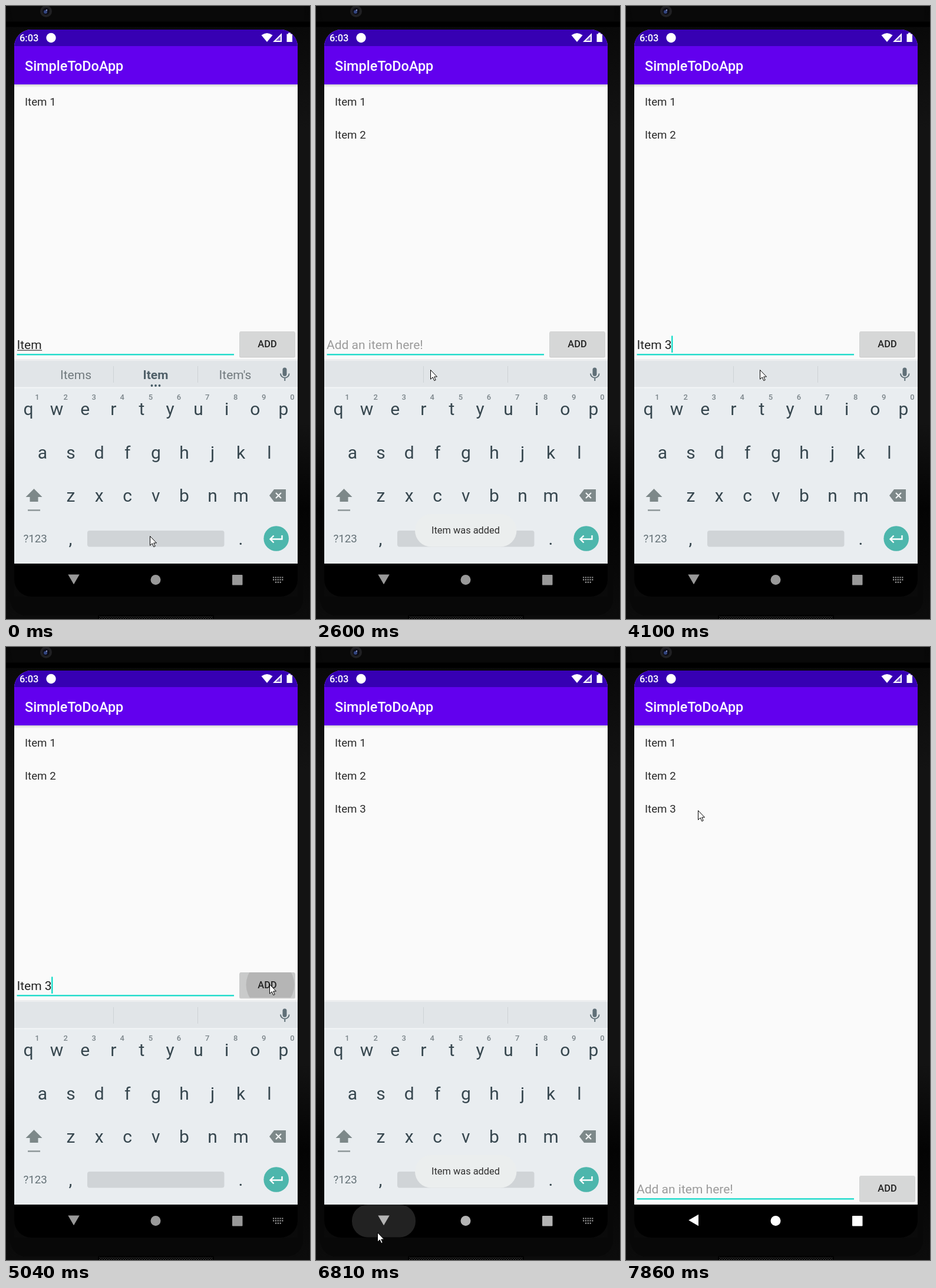
An HTML page for the animation above (8 s loop, 516 px wide and 1040 px high).

```html
<!DOCTYPE html>
<html lang="en">
<head>
<meta charset="utf-8">
<title>To-do list</title>
<style>
  html, body { margin: 0; width: 100%; height: 100%; overflow: hidden; background: #000; }
  svg { display: block; width: 516px; height: 1040px; }
  text { font-family: Roboto, "Open Sans", sans-serif; white-space: pre; }
  .mid { text-anchor: middle; }
  .item { font-size: 18.7px; fill: #2b2b2b; }
  .word { font-size: 21px; fill: #70797d; text-anchor: middle; }
  .key { font-size: 30px; fill: #37474f; text-anchor: middle; }
  .num { font-size: 13px; font-weight: 500; fill: #7b858a; text-anchor: middle; }
</style>
</head>
<body>
<svg viewBox="0 0 516 1040">
  <defs>
    <linearGradient id="side" x2="0" y2="1">
      <stop offset="0" stop-color="#070707"/>
      <stop offset=".2" stop-color="#131313"/>
      <stop offset=".68" stop-color="#131313"/>
      <stop offset=".82" stop-color="#030303"/>
      <stop offset="1" stop-color="#0c0c0c"/>
    </linearGradient>
    <linearGradient id="fade" x2="0" y2="1">
      <stop offset="0" stop-opacity=".16"/>
      <stop offset="1" stop-opacity="0"/>
    </linearGradient>
    <clipPath id="screen"><rect x="14" y="40" width="481" height="962" rx="29"/></clipPath>
    <clipPath id="app"><rect x="14" y="40" width="481" height="906"/></clipPath>
    <clipPath id="face"><rect x="396.500" y="552" width="94" height="43" rx="2"/></clipPath>
    <pattern id="mesh" width="4" height="4" patternUnits="userSpaceOnUse">
      <path d="M0 0h2v2h-2zM2 2h2v2h-2z" fill="#262626"/>
    </pattern>
  </defs>

  <!-- phone body -->
  <rect width="516" height="1040" fill="url(#side)"/>
  <path d="M6 0H506V28H12Z" fill="#090909"/>
  <path d="M0 31H516" stroke="#000" stroke-width="9"/>
  <path d="M14 950V1002H495V950H504V1010Q500 1030 480 1034H30Q10 1030 6 1005V950Z" fill="#080808"/>
  <circle cx="68" cy="9" r="10" fill="#202023"/>
  <circle cx="68" cy="9" r="6" fill="#0d0d16"/>
  <circle cx="67" cy="10" r="3" fill="#33457f"/>
  <circle cx="69" cy="7" r="1.200" fill="#8c96c4"/>
  <rect x="156" y="1033" width="197" height="10" rx="3" fill="#000"/>
  <rect x="158" y="1035" width="193" height="6" fill="url(#mesh)"/>

  <g clip-path="url(#screen)">
    <rect x="14" y="40" width="481" height="962" fill="#000"/>
    <g clip-path="url(#app)">
      <rect x="14" y="40" width="481" height="906" fill="#fafafa"/>
      <rect x="14" y="133" width="481" height="5" fill="url(#fade)"/>
      <rect x="14" y="40" width="481" height="93" fill="#6200ee"/>
      <rect x="14" y="40" width="481" height="28" fill="#3700b3"/>
      <g fill="#fff">
        <text x="23" y="60" font-size="16.400" font-weight="500">6:03</text>
        <circle cx="76.500" cy="54" r="8.200"/>
        <path d="M433.500 49.500Q443 42.500 452.500 49.500L443 61Z"/>
        <path d="M468 46V61H453Z"/>
        <path d="M466 51V59H458Z" fill="#3700b3" opacity=".65"/>
        <path d="M479 45.500h4v2h3v13.500h-9.500v-13.500h2.500z"/>
        <text x="32" y="109.500" font-size="23.400" font-weight="500">SimpleToDoApp</text>
      </g>
      <text class="item" x="32" y="168.500">Item 1</text>
      <text class="item" id="item2" x="32" y="224.500">Item 2</text>
      <text class="item" id="item3" x="32" y="280.500">Item 3</text>

      <g id="form">
        <path d="M18.500 591.300H387" stroke="#0fd9c8" stroke-width="2.200"/>
        <text id="hint" x="18" y="582" font-size="21" fill="#9b9b9b">Add an item here!</text>
        <text id="entry" x="18.500" y="582" font-size="21" fill="#222"></text>
        <rect id="line" x="19" y="583.500" height="1.200" fill="#333"/>
        <rect id="caret" y="559.500" width="2.200" height="28.500" fill="#03dac5"/>
        <rect x="396" y="553" width="95" height="43.500" rx="2.500" fill="#bcbcbc" opacity=".7"/>
        <rect x="396.500" y="552" width="94" height="43" rx="2" fill="#d6d7d7"/>
        <g id="press" clip-path="url(#face)">
          <rect x="396" y="552" width="95" height="43" opacity=".06"/>
          <circle id="ripple" cx="448.500" cy="573" opacity=".1"/>
        </g>
        <text class="mid" x="443.500" y="579" font-size="16.400" font-weight="500" fill="#222">ADD</text>
      </g>

      <g id="board">
        <rect x="14" y="599" width="481" height="3" fill="#eceeef"/>
        <rect x="14" y="602" width="481" height="45" fill="#e1e5e8"/>
        <rect x="14" y="647" width="481" height="299" fill="#e9edf0"/>
        <path d="M14 647.500H495" stroke="#f3f5f7" stroke-width="2"/>
        <path d="M182.500 611V639M325.500 611V639" stroke="#cdd2d5"/>
        <g id="words">
          <text class="word" x="118.500" y="633"></text>
          <text class="word" x="254" y="633" style="font-weight:700;fill:#4f5f68"></text>
          <text class="word" x="389" y="633"></text>
          <path d="M247.500 644h0M254 644h0M260.500 644h0" stroke="#455a64" stroke-width="3.800" stroke-linecap="round"/>
        </g>
        <rect x="469.500" y="613.500" width="7" height="14.500" rx="3.500" fill="#607078"/>
        <path d="M466 623.500a7.300 7.300 0 0 0 14.600 0M473.300 631V636" fill="none" stroke="#607078" stroke-width="2"/>
        <g id="keys"></g>
        <path d="M47.500 819L61.500 833H54.500V841H40.500V833H33.500Z" fill="#7d8889"/>
        <path d="M37 855.500H58" stroke="#8a9495" stroke-width="2.400"/>
        <path d="M455 820H475V841H455L447 830.500Z" fill="#7d8889"/>
        <path d="M458 826l9 9M467 826l-9 9" stroke="#f2f4f5" stroke-width="2.200"/>
        <text x="29.500" y="910" font-size="18.700" fill="#637076">?123</text>
        <rect x="138" y="890" width="232.500" height="27.500" rx="4" fill="#d0d4d7"/>
        <circle cx="458.700" cy="903.500" r="21.300" fill="#4db6ac"/>
        <path d="M468.500 898V904.500H449M454.500 898.500L448.500 904.500L454.500 910.500" fill="none" stroke="#fff" stroke-width="2.400"/>
      </g>
      <g id="toast">
        <rect x="168" y="862" width="172.500" height="55.500" rx="27.700" fill="#ebeeee"/>
        <text class="mid" x="254" y="895" font-size="16.400" fill="#303030">Item was added</text>
      </g>
    </g>

    <rect id="halo" x="61" y="946" width="108" height="55.500" rx="27" fill="#222"/>
    <g id="nav">
      <path id="back" d="M-9.700 -8H9.700L0 8.700Z" stroke-linejoin="round"/>
      <circle cx="254" cy="973.500" r="8.500"/>
      <rect x="384" y="965" width="17.500" height="17.500" rx="1"/>
      <path id="kbd" fill="none" stroke="#999" stroke-width="2.200" stroke-dasharray="2.200 1.600" d="M453 969.500H471M453 973.300H471M457 977.600H467"/>
    </g>
  </g>
  <path id="mouse" d="M.5 .5V16.200L4.200 12.800L6.800 18.600L9.200 17.500L6.700 12H11.500Z" fill="#fff" stroke="#000"/>
</svg>

<script>
const $ = id => document.getElementById(id);
const set = (id, attrs) => {
  for (const k in attrs) $(id).setAttribute(k, attrs[k]);
};
const show = (id, on) => set(id, { visibility: on ? "visible" : "hidden" });
const clamp = v => Math.max(0, Math.min(1, v));
const ramp = (t, from, to) => clamp((t - from) / (to - from));

// keyboard letters
const key = (cls, ch, x, y) => `<text class="${cls}" x="${x}" y="${y}">${ch}</text>`;
const row = (cls, chars, x, y) =>
  [...chars].map((ch, i) => key(cls, ch, x + i * 48.1, y)).join("");
$("keys").innerHTML =
  row("num", "1234567890", 53, 668) +
  row("key", "qwertyuiop", 38, 694) +
  row("key", "asdfghjkl", 62, 767.5) +
  row("key", "zxcvbnm", 110, 841) +
  key("key", ",", 109.5, 914) + key("key", ".", 398.5, 914);

const ticks = [
  0, 120, 240, 360, 480, 600, 720, 1150, 1270, 1390, 1540, 1660, 1780, 1900,
  2050, 2170, 2600, 2720, 2870, 2990, 3110, 3260, 3410, 3530, 3680, 3830,
  3980, 4100, 4220, 4370, 4520, 4640, 5040, 5160, 5280, 5430, 5550, 5670, 5790,
  5940, 6060, 6180, 6300, 6420, 6540, 6690, 6810, 6960, 7080, 7200,
  7350, 7470, 7590, 7710, 7860
];

// time, x, y of the pointer
const path = [
  [0, 244, 899], [120, 246, 895], [720, 453, 568], [1270, 453, 568],
  [1390, 359, 588], [1900, 199, 617], [2170, 194, 617], [3680, 194, 617],
  [3830, 202, 617], [4100, 227, 617], [4220, 245, 618], [4370, 288, 612],
  [4640, 447, 572], [5280, 447, 572], [5670, 342, 546], [5790, 340, 543],
  [5940, 332, 530], [6540, 114, 1009], [6690, 104, 995], [6810, 103.5, 993],
  [7200, 140, 357], [7590, 124, 280], [7710, 123, 278], [7860, 122, 277]
];

// time, typed text, suggestions, still composing
const full = ["Items", "Item", "Item's"];
const typing = [
  [-600, "Item", full, true],
  [120, "Item ", full],
  [240, "Item 2"],
  [1270, ""],
  [2720, "I", null, true],
  [2870, "It", ["In", "I", "It"], true],
  [3110, "Ite", ["Is", "It", "It's"], true],
  [3260, "Item", full, true],
  [3830, "Item ", full],
  [3980, "Item 3"],
  [5160, ""]
];

const last = (list, t) => list.filter(e => e[0] <= t).pop();

function pointer(t) {
  const a = last(path, t), b = path[path.indexOf(a) + 1] || a;
  const k = a === b ? 0 : ramp(t, a[0], b[0]);
  return [1, 2].map(i => Math.round(a[i] + (b[i] - a[i]) * k));
}

function drawForm(t) {
  const [start, text, words, composing] = last(typing, t);
  $("entry").textContent = text;
  const width = text ? $("entry").getComputedTextLength() : 0;
  show("hint", !text);
  show("line", composing);
  set("line", { width });
  set("caret", { x: 18 + width });
  const since = text ? t - start : t - 100;
  show("caret", since % 1000 >= 0 && since % 1000 < 500);
  show("words", words);
  $("words").querySelectorAll("text").forEach((el, i) => el.textContent = words ? words[i] : "");

  const held = t - (t < 5040 ? 1150 : 5040);
  show("press", held >= 0 && held < 240);
  set("ripple", { r: 41 + Math.max(0, held) / 4 });
  set("form", { transform: `translate(0 ${t < 6810 ? 0 : 345})` });
}

function drawNav(t) {
  const light = Math.round(153 + 102 * ramp(t, 6690, 7140));
  set("nav", { fill: `rgb(${light},${light},${light})` });
  set("back", { transform: `translate(115 972.500) rotate(${90 * ramp(t, 6810, 7140)})` });
  set("halo", { opacity: Math.min(ramp(t, 6570, 6810), 1 - ramp(t, 6810, 7200)) });
  show("kbd", t < 6960);
}

function draw(t) {
  t = ticks.filter(s => s <= t).pop();
  show("item2", t >= 1270);
  show("item3", t >= 5160);
  drawForm(t);
  drawNav(t);
  const hide = ramp(t, 6810, 7200);
  set("board", { transform: `translate(0 ${350 * hide * hide})` });
  const toast = (on, off) => ramp(t, on, on + 480) * (1 - ramp(t, off, off + 450));
  set("toast", { opacity: Math.max(toast(1300, 3150), toast(5190, 7220)) });
  set("mouse", { transform: `translate(${pointer(t)})` });
}

function loop() {
  draw(performance.now() % 8000);
  requestAnimationFrame(loop);
}
loop();
</script>
</body>
</html>
```
